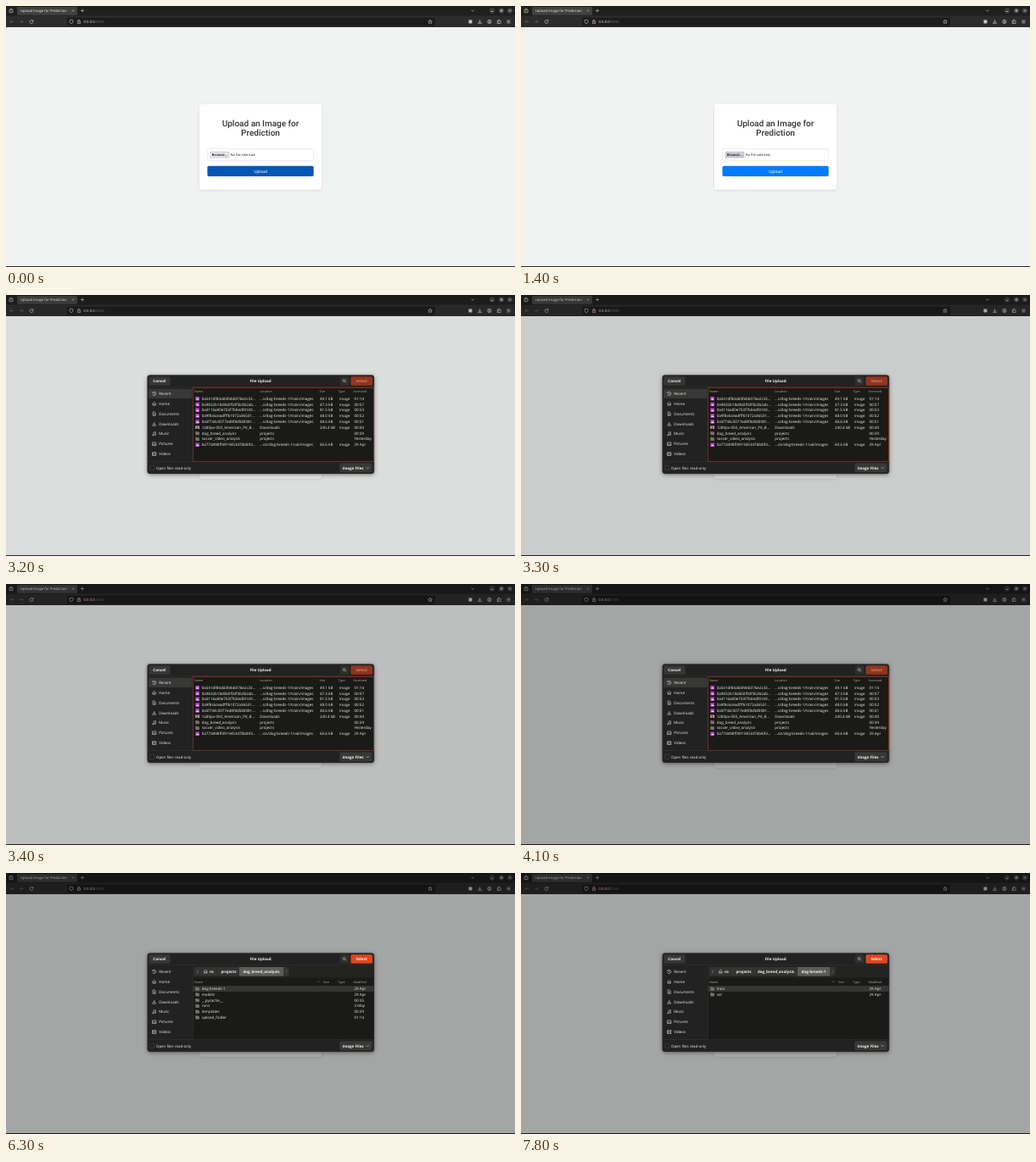
These frames come from a looping animation (600x308 px, 8000 ms). An HTML page:

```html
<!DOCTYPE html>
<html lang="en">
<head>
<meta charset="utf-8">
<style>
html, body { margin: 0; width: 100%; height: 100%; overflow: hidden; background: #f1f3f3; }
svg { display: block; width: 600px; height: 308px; }
text { font-family: "Open Sans", "Noto Sans", sans-serif; text-rendering: geometricPrecision; white-space: pre; }
.page { font-family: Roboto, sans-serif; }
</style>
</head>
<body>
<svg id="stage" viewBox="0 0 600 308"></svg>
<script>
const LOOP = 8000;

const rect = (x, y, w, h, fill, r = 0, extra = '') =>
  `<rect x="${x}" y="${y}" width="${w}" height="${h}" rx="${r}" fill="${fill}" ${extra}/>`;
const text = (x, y, s, { size = 4.5, fill = '#eee', weight = 400, anchor = 'start', cls = '' } = {}) =>
  `<text x="${x}" y="${y}" font-size="${size}" fill="${fill}" font-weight="${weight}" text-anchor="${anchor}" class="${cls}">${s}</text>`;
const bold = (x, y, s, fill = '#f2f2f2') => text(x, y, s, { weight: 700, fill, anchor: 'middle' });
const circle = (x, y, r, fill) => `<circle cx="${x}" cy="${y}" r="${r}" fill="${fill}"/>`;
// Line icon drawn around its own centre
const icon = (x, y, d, color = '#d0d0d0', width = 0.6) =>
  `<path transform="translate(${x} ${y})" d="${d}" fill="none" stroke="${color}" stroke-width="${width}"/>`;
const group = (id, body, extra = '') => `<g id="${id}" ${extra}>${body}</g>`;

const shape = {
  close: 'M-1.1-1.1L1.1 1.1M1.1-1.1L-1.1 1.1',
  plus: 'M-2 0H2M0-2V2',
  caretDown: 'M-1.6-.8L0 .8L1.6-.8',
  caretUp: 'M-1.3 .6L0-.7L1.3 .6',
  left: 'M.7-1.5L-.7 0L.7 1.5',
  right: 'M-.7-1.5L.7 0L-.7 1.5',
  back: 'M2 0H-2M-.3-1.7L-2 0L-.3 1.7',
  forward: 'M-2 0H2M.3-1.7L2 0L.3 1.7',
  reload: 'M1.9-.7A2 2 0 1 0 2 .5M2-2.2V-.6H.4',
  shield: 'M0-2.4L2-1.6V0Q1.8 1.7 0 2.4Q-1.8 1.7-2 0V-1.6Z',
  lock: 'M-1.6-.3H1.6V2.1H-1.6ZM-1-.3V-1.2A1 1 0 0 1 1-1.2V-.3',
  star: 'M0-2.3L.7-.7L2.3-.6L1.1 .5L1.5 2.1L0 1.2L-1.5 2.1L-1.1 .5L-2.3-.6L-.7-.7Z',
  download: 'M0-2.2V1M-1.4-.4L0 1L1.4-.4M-2 1V2.1H2V1',
  account: 'M-2.2 0A2.2 2.2 0 1 1 2.2 0A2.2 2.2 0 1 1-2.2 0M-.8-.6A.8 .8 0 1 1 .8-.6A.8 .8 0 1 1-.8-.6M-1.4 1.6Q0 0 1.4 1.6',
  puzzle: 'M-2-1H-.6V-2.2H.6V-1H2V2H-2V1.1H-.8V-.1H-2Z',
  menu: 'M-2-1.5H2M-2 0H2M-2 1.5H2',
  window: 'M-2-1.2H2V2.2H-2ZM-1.2-2.2H1.2M0 0V1.2',
  search: 'M-1.8-.4A1.4 1.4 0 1 1 1-.4A1.4 1.4 0 1 1-1.8-.4M.6 .7L2 2.1',
  clock: 'M-1.6-1.3A2.1 2.1 0 1 1-2 .6M-2.1-2V-.9H-1M0-1.2V.2L1 .7',
  home: 'M-2.3 .2L0-2L2.3 .2M-1.6-.3V2H-.5V.6H.5V2H1.6V-.3',
  doc: 'M-1.6-2.2H.5L1.6-1.1V2.2H-1.6ZM-.8 0H.8M-.8 1H.8',
  music: 'M-.7 1.4V-1.9L1.7-2.2V1M-.7 1.5A.7 .6 0 1 1-.8 1.2M1.7 1A.7 .6 0 1 1 1.6 .7',
  picture: 'M-2.2-1.8H2.2V1.8H-2.2ZM-1.8 1.4L-.4-.3L.6 .8L1.2 .2L2 1.4',
  video: 'M-2.2-1.8H2.2V1.8H-2.2ZM-1.1-1.8V1.8M1.1-1.8V1.8',
};

function browser() {
  const faint = '#6c6c6c';
  let s = rect(0, 0, 600, 12, '#1f1f1f') + rect(0, 11.5, 600, 13.5, '#2d2c2c')
    + rect(13, 1, 71, 9.7, '#424142', 1.3) + rect(72, 13.7, 434, 9.8, '#1d1c1d', 1.3)
    + icon(6, 5.5, shape.window)
    + text(17, 7.1, 'Upload Image for Prediction', { size: 4.2 })
    + icon(79, 5.5, shape.close, '#ccc', 0.5) + icon(90, 5.5, shape.plus)
    + icon(550, 5.5, shape.caretDown);
  for (const x of [573, 584, 594]) s += circle(x, 5.5, 3.2, '#3d3d3d');
  s += icon(573, 5.5, 'M-1.2 1H1.2', '#eee') + icon(584, 5.5, 'M-1-1H1V1H-1Z', '#eee')
    + icon(594, 5.5, shape.close, '#eee');
  s += icon(7, 18.5, shape.back, faint) + icon(18, 18.5, shape.forward, faint) + icon(30, 18.5, shape.reload)
    + icon(77, 18.5, shape.shield) + icon(86, 18.5, shape.lock) + icon(86, 18.5, 'M-2-2L2 2', '#d33')
    + text(91.5, 20.1, '0.0.0.0<tspan fill="#777">:5555</tspan>', { size: 4.3 })
    + icon(500, 18.5, shape.star) + rect(545.4, 16.4, 4, 4, '#c8c8c8', 0.4);
  ['download', 'account', 'puzzle', 'menu'].forEach((k, i) => s += icon(558.5 + 11.3 * i, 18.5, shape[k]));
  return s;
}

function page() {
  const title = { size: 10, weight: 500, fill: '#333', anchor: 'middle', cls: 'page' };
  return rect(0, 25, 600, 283, '#f1f3f3')
    + rect(228, 116, 144, 100.5, '#fff', 3, 'filter="url(#cardShadow)"')
    + text(300, 141.6, 'Upload an Image for', title) + text(300, 153.4, 'Prediction', title)
    + rect(237.6, 168.6, 124.8, 14, '#fff', 1.6, 'stroke="#ddd" stroke-width=".5"')
    + rect(241, 172.2, 21.8, 6.7, '#e9e9ed', 0.8, 'id="browse" stroke="#8f8f9d" stroke-width=".4"')
    + text(251.9, 177.1, 'Browse…', { size: 4.2, fill: '#111', weight: 600, anchor: 'middle' })
    + text(264.4, 177.1, 'No file selected.', { size: 4.1, fill: '#222', weight: 500 })
    + rect(237.4, 188.7, 125.2, 12.2, '#0056b3', 1.7, 'id="upload"')
    + text(300, 196.6, 'Upload', { size: 5, fill: '#fff', anchor: 'middle', cls: 'page' })
    + rect(0, 307, 600, 1, '#2a2a2a');
}

const ROW = 6.82;
const folderIcon = y => rect(223.3, y - 2, 2.2, 1.2, '#77716c', 0.3) + rect(223.3, y - 1.5, 4.6, 3.7, '#77716c', 0.4);
const imageIcon = y => rect(223.3, y - 2.2, 4.6, 4.5, '#bd3fd0', 0.6)
  + `<path d="M224 ${y + 1.5}l1.2-2 1 1 .6-.6.7 1.6z" fill="#f3d5f6"/>`;
const photoIcon = y => rect(223.2, y - 1.7, 4.8, 3.5, '#b9a9a3') + rect(224.7, y - 0.9, 1.6, 2.6, '#7a3a35');

const headings = (y, last, sized) => [[222, 'Name'], ...sized, [391.5, 'Type'], [409.5, last]]
  .map(([x, s]) => text(x, y, s, { size: 3.7, fill: '#aaa' })).join('');

function recentList() {
  const train = '…s/dog-breeds-1/train/images', val = '…sis/dog-breeds-1/val/images';
  const rows = [
    ['0a541df84dd3febb076e2c33…', train, '49.1 kB', '01:14'],
    ['0a9832b18d360f50f5b3b2ab…', train, '47.3 kB', '00:57'],
    ['0a4116a80e753f7b0edf4149…', train, '81.5 kB', '00:53'],
    ['0a9f8c6ceadfff61072a36531…', train, '48.0 kB', '00:52'],
    ['0a5f744c5077ed8f8d580081…', train, '48.6 kB', '00:51'],
    ['1280px-003_American_Pit_B…', 'Downloads', '240.4 kB', '00:40'],
    ['dog_breed_analysis', 'projects', '', '00:39'],
    ['soccer_video_analysis', 'projects', '', 'Yesterday'],
    ['0a77d498ff49194534 7bb893…'.replace(' ', ''), val, '60.6 kB', '29 Apr'],
  ];
  return rect(220.5, 109, 213, 87.5, '#1a1a18')
    + headings(115.2, 'Accessed', [[299, 'Location'], [369.5, 'Size']])
    + rect(221, 159.7, 212, 6.9, '#363635', 0, 'id="recentPick"')
    + rows.map(([name, place, size, when], i) => {
      const y = 122.1 + ROW * i, b = y + 1.6;
      const draw = !size ? folderIcon : place === 'Downloads' ? photoIcon : imageIcon;
      return draw(y) + text(230.7, b, name) + text(299.3, b, place) + text(370, b, size)
        + text(393, b, size && 'Image', { size: 4.3 }) + text(410.5, b, when);
    }).join('')
    + rect(220.6, 109.3, 212.8, 87, 'none', 0, 'stroke="#a63a25" stroke-width=".7"');
}

function folderList(crumbs, barEnd, rows, pickId) {
  const [x0, x1] = crumbs.at(-1);
  return rect(220.5, 109, 213, 87.5, '#1a1a18') + rect(220.5, 109, 213, 14.5, '#232321')
    + rect(222, 111, barEnd - 222, 10.6, '#333332', 1.5)
    + rect(x0, 111, x1 - x0, 10.6, '#5b5b5a')
    + icon(226, 116.3, shape.left, '#aaa') + icon(235.3, 116.2, shape.home)
    + bold(242.4, 117.9, 'ro') + bold(262.5, 117.9, 'projects')
    + crumbs.map(([a, b, s]) => bold((a + b) / 2, 117.9, s)).join('')
    + icon(barEnd - 3, 116.3, shape.right, '#777')
    + headings(129.6, 'Modified', [[374, 'Size']]) + icon(368.3, 128.2, shape.caretUp, '#999', 0.5)
    + rect(220.5, 133.1, 213, 6.9, '#353534', 0, `id="${pickId}"`)
    + rows.map(([name, when], i) => {
      const y = 136.6 + 6.74 * i;
      return folderIcon(y) + text(230.7, y + 1.6, name) + text(410.5, y + 1.6, when);
    }).join('');
}

function dialog() {
  const places = [['Recent', 'clock'], ['Home', 'home'], ['Documents', 'doc'], ['Downloads', 'download'],
    ['Music', 'music'], ['Pictures', 'picture'], ['Videos', 'video']];
  const analysis = 'dog_breed_analysis', breeds = 'dog-breeds-1';
  return rect(166.7, 94.6, 267.2, 116.3, '#232321', 3, 'stroke="#3c3c3a" stroke-width=".5" filter="url(#dialogShadow)"')
    + rect(168.5, 96.2, 25, 10.6, '#373736', 1.6) + bold(180.8, 103, 'Cancel')
    + bold(300, 103, 'File Upload')
    + rect(393.7, 96.2, 10.6, 10.6, '#2f2f2e', 1.6) + icon(399, 101.4, shape.search)
    + rect(406.4, 96.2, 25.6, 10.6, '#92351e', 1.6, 'id="select"')
    + text(419.2, 103, 'Select', { weight: 700, fill: '#c98675', anchor: 'middle' }).replace('<text', '<text id="selectLabel"')
    + rect(167, 108.4, 266.6, 0.4, '#383836')
    + rect(168, 110.7, 51.5, 11.4, '#383837', 1.5, 'id="recentPlace"')
    + places.map(([name, key], i) => {
      const y = 116.4 + 11.87 * i;
      return icon(174.7, y, shape[key]) + text(180.2, y + 1.6, name);
    }).join('')
    + group('recent', recentList())
    + group('analysis', folderList([[275, 327, analysis]], 333.5,
      [[breeds, '29 Apr'], ['models', '29 Apr'], ['__pycache__', '00:35'], ['runs', '3 May'],
        ['templates', '00:39'], ['upload_folder', '01:14']], 'breedsPick'))
    + group('breeds', folderList([[275, 326, analysis], [326, 364, breeds]], 370.5,
      [['train', '29 Apr'], ['val', '29 Apr']], 'trainPick'))
    + rect(220.6, 123.4, 212.8, 73, 'none', 0, 'id="focusRing" stroke="#a63a25" stroke-width=".7"')
    + rect(220.2, 109, 0.4, 87.5, '#383836') + rect(167, 196.6, 266.6, 0.4, '#383836')
    + rect(169.9, 201.4, 5, 5, '#1f1f1e', 0.9, 'stroke="#555" stroke-width=".5"')
    + text(177, 205.7, 'Open files read-only', { size: 4.4 })
    + rect(393.2, 198.6, 38.4, 10.6, '#383837', 1.6) + bold(409, 205.6, 'Image Files')
    + icon(426.2, 204, shape.caretDown);
}

const shadow = (id, dy, blur, alpha) =>
  `<filter id="${id}" x="-20%" y="-20%" width="140%" height="150%"><feDropShadow dx="0" dy="${dy}" stdDeviation="${blur}" flood-opacity="${alpha}"/></filter>`;

document.getElementById('stage').innerHTML =
  `<defs>${shadow('cardShadow', 1.2, 1.8, 0.1)}${shadow('dialogShadow', 1, 2.5, 0.4)}</defs>`
  + page() + browser()
  + rect(0, 0, 600, 308, '#000', 0, 'id="dim"')
  + group('dialog', dialog());

const el = Object.fromEntries([...document.querySelectorAll('#stage [id]')].map(e => [e.id, e]));
const show = (id, on) => el[id].setAttribute('visibility', on ? 'inherit' : 'hidden');
const set = (id, name, value) => el[id].setAttribute(name, value);
const ramp = (t, start, length) => Math.min(1, Math.max(0, (t - start) / length));
const mix = (a, b, p) => `rgb(${a.map((v, i) => Math.round(v + (b[i] - v) * p))})`;

function draw(t) {
  set('upload', 'fill', mix([0, 86, 179], [0, 123, 255], ramp(t, 50, 250)));
  set('browse', 'fill', t >= 2800 && t < 3000 ? '#b1b1b9' : t >= 800 ? '#d0d0d7' : '#e9e9ed');

  const fade = 1 - (1 - ramp(t, 3095, 720)) ** 2;
  set('dim', 'opacity', 0.32 * fade);
  const open = ramp(t, 2960, 150);
  set('dialog', 'visibility', open > 0 ? 'visible' : 'hidden');
  set('dialog', 'transform', `translate(0 ${152.8 * (1 - open)}) scale(1 ${open})`);

  show('recentPlace', t < 5300);
  show('recent', t < 5300);
  show('recentPick', t >= 5200 && t < 5300);
  show('analysis', t >= 5300 && t < 6900);
  show('breedsPick', t >= 5800 && t < 6900);
  show('breeds', t >= 6900);
  show('focusRing', t >= 5300 && t < 6300);
  set('focusRing', 'opacity', 1 - ramp(t, 6150, 150));

  const enabled = t >= 5800 || (t >= 5200 && t < 5300);
  set('select', 'fill', enabled ? '#e2451f' : '#92351e');
  set('selectLabel', 'fill', enabled ? '#fff' : '#c98675');
}

function tick() {
  draw(performance.now() % LOOP);
  requestAnimationFrame(tick);
}
tick();
</script>
</body>
</html>
```
